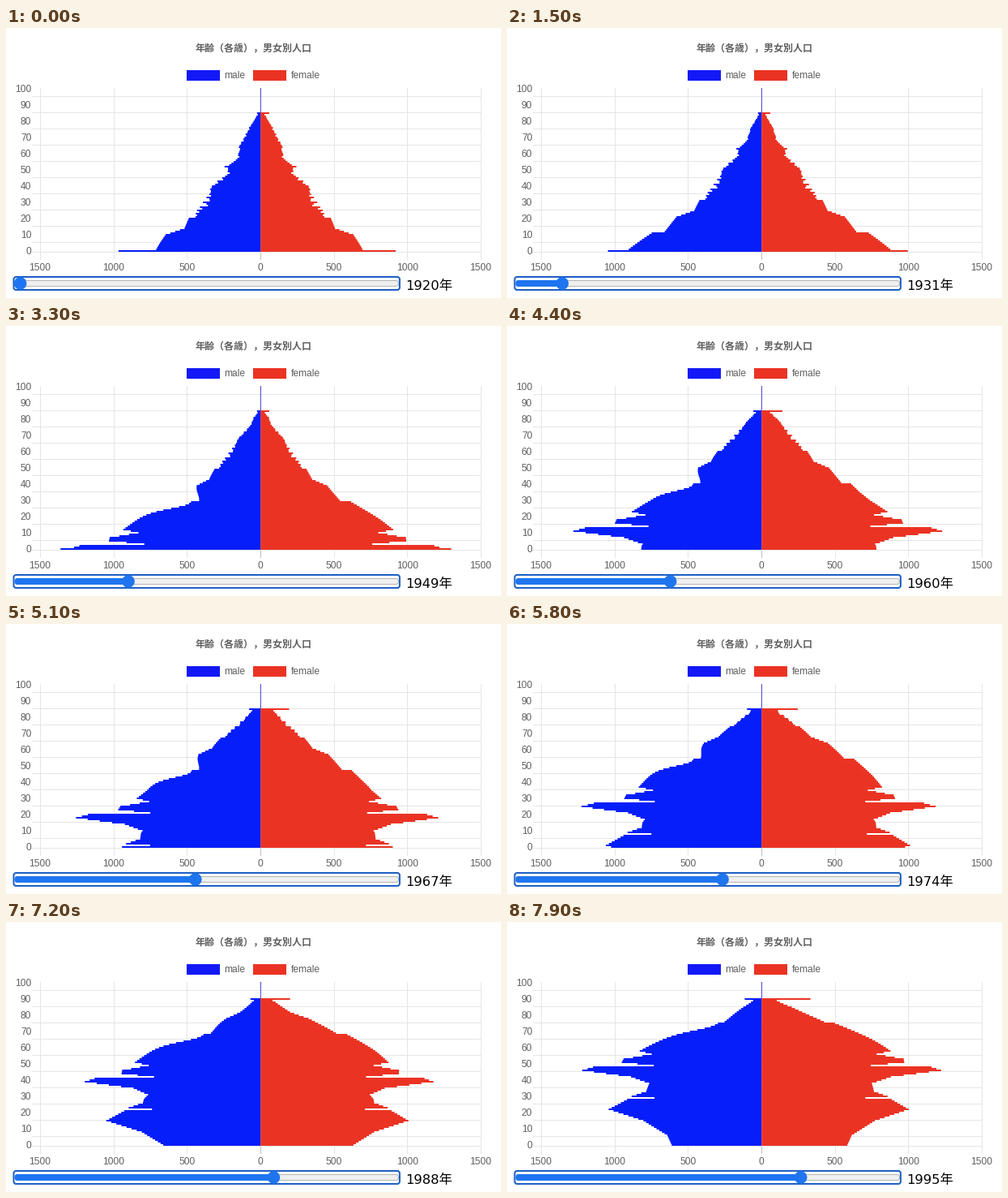
These frames come from a looping animation (611 px wide and 333 px high, 8 s). A matplotlib script:

```python
import numpy as np
import matplotlib.pyplot as plt
from matplotlib.animation import FuncAnimation
from matplotlib.patches import Circle, FancyBboxPatch, Polygon, Rectangle

W, H, DPI = 611, 333, 100
PX = 72 / DPI
BLUE, RED, GRAY, ACCENT = "#061efa", "#eb3324", "#606060", "#1f75f0"
LEFT, TOP, BOTTOM, ROW = 42.4, 74, 276, 2
UNIT = 544 / 3000
MID = LEFT + 1500 * UNIT
FIRST, LAST, SPLIT = 1920, 1995, 1975
AGES = np.arange(101)

# Turning points in yearly births (thousands), with small ripples before 1900.
BIRTHS = {1840: 1180, 1856: 1080, 1862: 900, 1868: 1160, 1872: 1000, 1880: 1250,
          1892: 1200, 1900: 1420, 1906: 1410, 1910: 1700, 1919: 1760, 1920: 1965,
          1930: 2095, 1937: 2150, 1939: 1870, 1942: 2240, 1944: 2210, 1946: 1667,
          1947: 2578, 1949: 2692, 1953: 1902, 1957: 1600, 1962: 1611, 1965: 1796,
          1966: 1476, 1967: 1850, 1973: 2078, 1980: 1592, 1989: 1263, 1995: 1200}
YEARS = np.arange(FIRST - 100, LAST + 1)
SIZE = np.interp(YEARS, list(BIRTHS), list(BIRTHS.values()))
ripple = np.random.default_rng(4).normal(0, .035, len(YEARS))
SIZE *= 1 + np.where(YEARS < 1900, ripple, 0)


def survival(year, female):
    """Share alive at each age, moving from the early to the modern curve."""
    share, limit, rate, growth = ((.81, 88, .0021, .0765) if female
                                  else (.79, 87, .0049, .07))
    early = share * (1 - np.minimum(AGES / limit, 1) ** 1.3)
    early[0] = .96
    modern = np.exp(-rate * np.exp(growth * AGES))
    start = np.interp(AGES, [0, 30], [1920, 1947])
    end = np.interp(AGES, [0, 35], [1958, 1995])
    progress = np.clip((year - start) / (end - start), 0, 1)
    return early + (modern - early) * progress


def war_loss(born, year):
    width = np.where(born < 1921, 9, 4)
    ramp = np.clip((year - 1941) / 5, 0, 1)
    return 1 - .25 * ramp * np.exp(-((born - 1921) / width) ** 2)


def top_age(year):
    return 85 if year < SPLIT else 90


def open_group(year, female):
    """Everyone in the last, open-ended age group."""
    if year < SPLIT:
        base, slope = (58, 7.5) if female else (25, 3)
        return base + slope * max(0, year - 1949)
    base, slope = (55, 3.09) if female else (20, 1.07)
    return base + slope * (year - SPLIT) ** 1.5


def people(year, female):
    born = year - AGES
    n = np.interp(born, YEARS, SIZE) * survival(year, female)
    n *= .487 if female else .513 * war_loss(born, year)
    top = top_age(year)
    n[top] = open_group(year, female)
    return n[:top + 1]


def outline(values, side):
    """Stepped silhouette of the bars, youngest at the bottom."""
    x = MID + side * np.repeat(values, 2) * UNIT
    y = BOTTOM - ROW * np.repeat(np.arange(len(values) + 1), 2)[1:-1]
    return np.column_stack([np.r_[MID, x, MID], np.r_[y[0], y, y[-1]]])


fig = plt.figure(figsize=(W / DPI, H / DPI), dpi=DPI, facecolor="white")
ax = fig.add_axes([0, 0, 1, 1])
ax.set(xlim=(0, W), ylim=(H, 0))
ax.axis("off")


def line(x0, y0, x1, y1, color="#e5e5e5"):
    ax.plot([x0, x1], [y0, y1], color=color, lw=PX, solid_capstyle="butt",
            zorder=1, snap=False)


def label(x, y, s, size=12, color=GRAY, font="Liberation Sans", **kw):
    return ax.text(x, y, s, fontsize=size * PX, color=color, family=font, **kw)


def box(x, y, w, h, r, fc, ec="none", lw=0, z=3):
    patch = FancyBboxPatch((x, y), w, h, boxstyle=f"round,pad=0,rounding_size={r}",
                           fc=fc, ec=ec, lw=lw * PX, zorder=z, snap=False)
    return ax.add_patch(patch)


def bars(color):
    return ax.add_patch(Polygon([[0, 0]], fc=color, ec="none", zorder=3, snap=False))


# Title and legend
label(306, 28.5, "年齢（各歳），男女別人口", font="Noto Sans CJK JP",
      weight="bold", ha="center")
for x, color, name in [(223, "#1219f6", "male"), (305, RED, "female")]:
    ax.add_patch(Rectangle((x, 52), 41, 13, fc=color, ec="none"))
    label(x + 46.5, 62, name)

# Grid and axis labels
for k in range(7):
    x = LEFT + k * 500 * UNIT
    gx = np.floor(x) + .5
    line(gx, TOP, gx, 286, "#bfbfbf" if k == 3 else "#e5e5e5")
    label(x - .4, 299, str(abs(1500 - 500 * k)), ha="center")
for age in range(0, 101, 10):
    y = BOTTOM - (age + .5) * ROW
    label(31.3, y + 3.8, str(age), ha="right")
    if age:
        line(32, y + 9.5, 586, y + 9.5)
line(32, BOTTOM + .5, 586, BOTTOM + .5)

# Bars
male, female = bars(BLUE), bars(RED)
spine, = ax.plot([], [], color="#3a2ce8", lw=1.2 * PX, ls=(0, (1.2, .5)),
                 dash_capstyle="butt", zorder=4, snap=False)

# Slider
box(9.5, 307, 476.4, 16, 3, "white", "#1c5fc4", 2, 2)
box(11, 311.5, 473.5, 7, 3.5, "#efefef", "#b4b4b4", 1)
filled = box(10.5, 311, 10, 8, 4, ACCENT, z=4)
knob = ax.add_patch(Circle((18, 315), 7.8, fc=ACCENT, ec="none", zorder=5))
caption = label(493.2, 322.5, "", 16.4, "black", ["DejaVu Sans", "Noto Sans CJK JP"])


def draw(i):
    year = FIRST + max(0, i - 4)
    male.set_xy(outline(people(year, False), -1))
    female.set_xy(outline(people(year, True), 1))
    spine.set_data([MID, MID], [TOP, BOTTOM - (top_age(year) + 1) * ROW])
    x = 17.6 + 4.6 * (year - FIRST)
    knob.center = (x, 315)
    filled.set_width(x - 10.5)
    caption.set_text(f"{year}年")
    return male, female, spine, knob, filled, caption


anim = FuncAnimation(fig, draw, frames=80, interval=100, repeat=True,
                     repeat_delay=0, blit=False)
plt.show()
```
